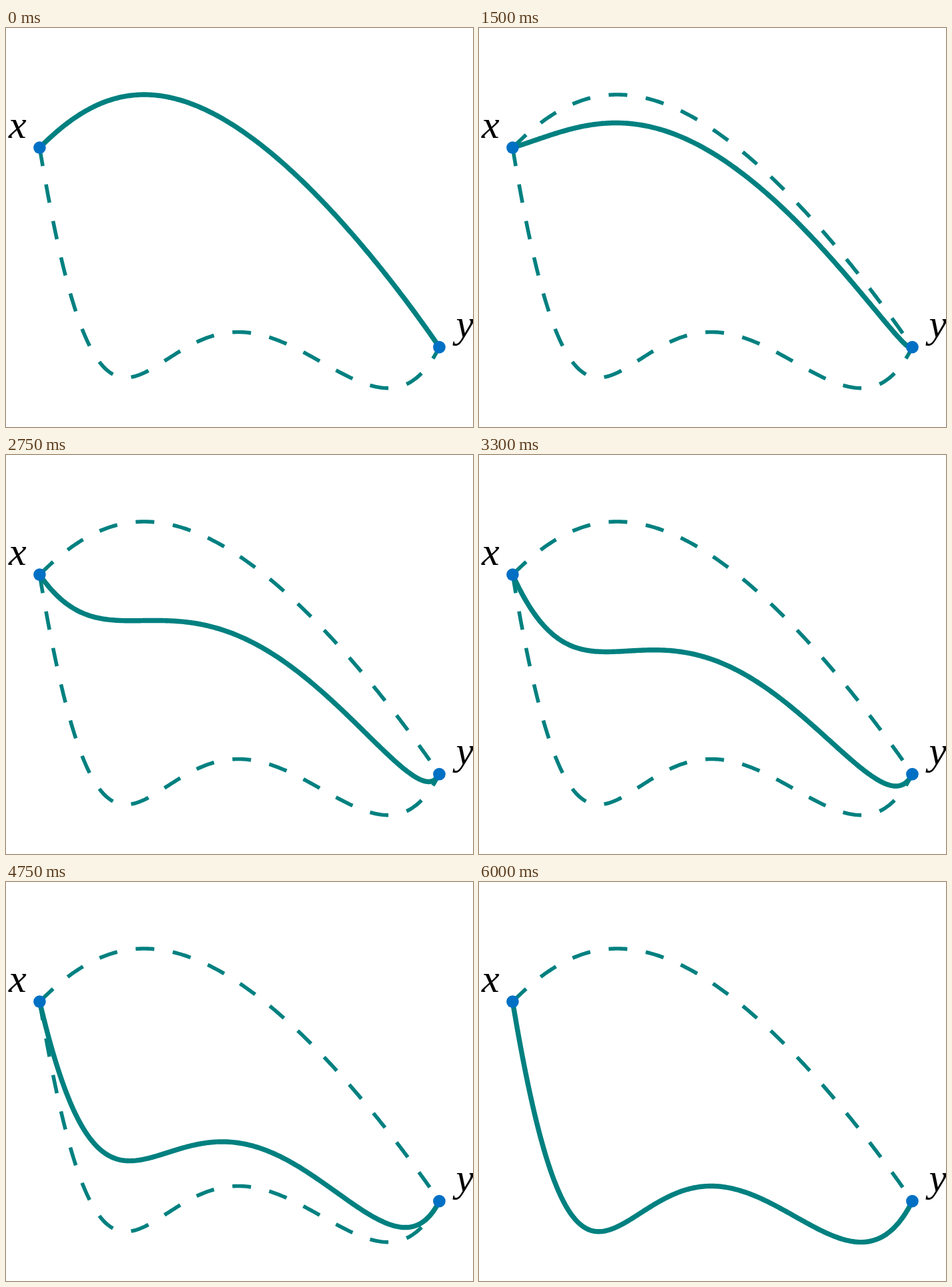
Animation of 700 by 599 pixels, one loop 7.05 s. Source, as an HTML page with a canvas:

```html
<!DOCTYPE html>
<html lang="en">
<head>
<meta charset="utf-8">
<title>Path homotopy</title>
<style>
  html, body { margin: 0; width: 100%; height: 100%; overflow: hidden; background: #fff; }
  canvas { display: block; width: 700px; height: 599px; }
</style>
</head>
<body>
<canvas id="stage" width="700" height="599"></canvas>
<script>
const ctx = document.getElementById('stage').getContext('2d');

const LOOP = 7050, STEP = 50, HOLD = 20, STEPS = 100;
const ORIGIN = [50.4, 179.6], UNIT = 149.77, PT = 9.327;
const TEAL = '#008080', BLUE = '#0070c4';

// Control points of two quartic Bezier curves, y pointing up.
const upper = [[0, 0], [1, 1], [2, 1], [4, -2], [4, -2]];
const lower = [[0, 0], [1, -6], [1.4, 2], [3, -4], [4, -2]];

const mix = (a, b, s) => a + (b - a) * s;
const blend = (p, q, s) => p.map((c, i) => [mix(c[0], q[i][0], s), mix(c[1], q[i][1], s)]);
const toStage = ([x, y]) => [ORIGIN[0] + x * UNIT, ORIGIN[1] - y * UNIT];

function bezier(points, t) {
  const weights = [1, 4, 6, 4, 1].map((c, i) => c * t ** i * (1 - t) ** (4 - i));
  return [0, 1].map(k => points.reduce((sum, p, i) => sum + p[k] * weights[i], 0));
}

function stroke(points, width, dash) {
  ctx.beginPath();
  for (let i = 0; i <= 240; i++) ctx.lineTo(...toStage(bezier(points, i / 240)));
  ctx.lineWidth = width;
  ctx.setLineDash(dash);
  ctx.strokeStyle = TEAL;
  ctx.stroke();
}

function dot(point) {
  ctx.beginPath();
  ctx.arc(...toStage(point), PT, 0, 2 * Math.PI);
  ctx.fillStyle = BLUE;
  ctx.fill();
}

function draw(s) {
  ctx.fillStyle = '#fff';
  ctx.fillRect(0, 0, 700, 599);

  const dash = [3 * PT, 3 * PT];
  stroke(upper, 0.6 * PT, dash);
  stroke(lower, 0.6 * PT, dash);
  stroke(blend(upper, lower, s), 0.8 * PT, []);
  dot(upper[0]);
  dot(upper[4]);

  ctx.fillStyle = '#000';
  ctx.font = 'italic 60px "Liberation Serif", "Times New Roman", serif';
  ctx.fillText('x', 4, 165);
  ctx.fillText('y', 674.5, 464);
}

const start = performance.now();
function tick() {
  const time = (performance.now() - start) % LOOP;
  const step = Math.floor(time / STEP) - HOLD;
  draw(Math.min(Math.max(step, 0), STEPS) / STEPS);
  requestAnimationFrame(tick);
}
tick();
</script>
</body>
</html>
```
